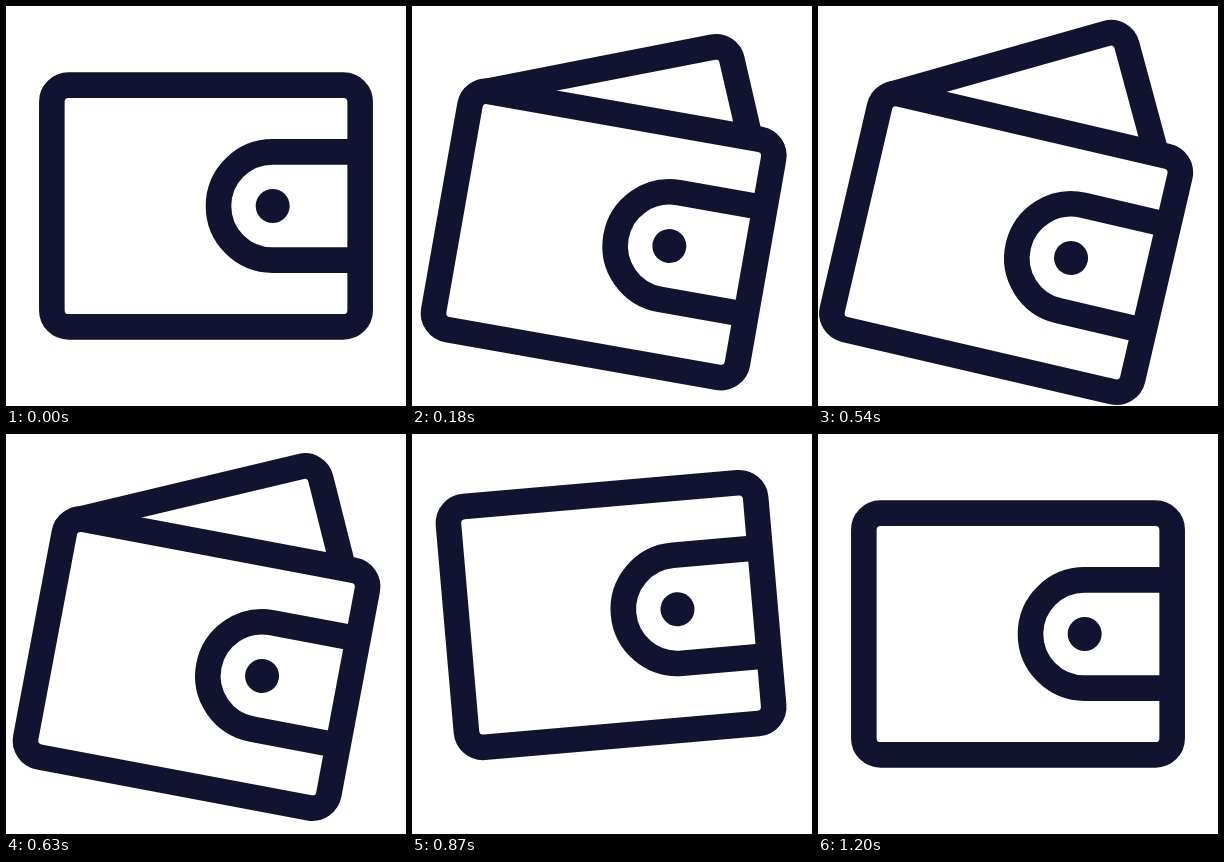
Recreate the animation shown at these times as an HTML page with a canvas. Size 400 px wide and 400 px high, loop 3230 ms.

```html
<!DOCTYPE html>
<html lang="en">
<head>
<meta charset="utf-8">
<title>Wallet</title>
<style>
  html, body { margin: 0; width: 100%; height: 100%; overflow: hidden; background: #fff; }
  canvas { display: block; width: 100vw; height: 100vh; }
</style>
</head>
<body>
<canvas id="stage" width="400" height="400"></canvas>
<script>
const ctx = document.getElementById('stage').getContext('2d');
const INK = '#121331';
const LOOP = 3230, STEP = 30;
const OPEN = 555, RECOIL = 880, REST = 1200;
const PIVOT = [33.3, 166.7];

const lerp = (a, b, k) => a + (b - a) * k;
const mix = (p, q, k) => [lerp(p[0], q[0], k), lerp(p[1], q[1], k)];
const span = (t, from, to) => Math.min(1, Math.max(0, (t - from) / (to - from)));
const smooth = x => x * x * (3 - 2 * x);

// Cubic bezier easing, solved by bisection
function bezier(x1, y1, x2, y2) {
  const at = (a, b, s) => 3 * a * s * (1 - s) ** 2 + 3 * b * s * s * (1 - s) + s ** 3;
  return x => {
    let lo = 0, hi = 1;
    for (let i = 0; i < 30; i++) {
      const mid = (lo + hi) / 2;
      if (at(x1, x2, mid) < x) lo = mid; else hi = mid;
    }
    return x >= 1 ? 1 : at(y1, y2, lo);
  };
}
const swing = bezier(0.167, 0.145, 0, 1);

function pose(t) {
  const up = t <= 0 ? 0 : swing(span(t, 0, OPEN));
  const down = smooth(span(t, OPEN, RECOIL));
  const back = smooth(span(t, RECOIL, REST));
  const recoil = down * (1 - back);
  return {
    angle: 13.1 * up * (1 - down) - 5 * recoil,
    shift: [-3.2 * recoil, -4.5 * recoil],
    card: up * (1 - smooth(span(t, OPEN, 870)))
  };
}

// The card's corner follows the wallet's corner when closed,
// and swings out on a slight arc
function drawCard(k) {
  const bow = 38 * k ** 3 * (1 - k);
  const corner = (from, to) => {
    const [x, y] = mix(from, to, k);
    return [x + bow, y - 0.39 * bow];
  };
  const a = corner([337.5, 79.17], [250.4, -26.9]);
  const tip = corner([354.17, 79.17], [265, -35]);
  const b = corner([354.17, 95.83], [272.7, -20.2]);
  ctx.beginPath();
  ctx.moveTo(...mix([62.5, 79.17], [54.4, 81.2], k));
  ctx.lineTo(...a);
  ctx.bezierCurveTo(...mix(a, tip, 0.552), ...mix(b, tip, 0.552), ...b);
  ctx.lineTo(lerp(331, 327, k), 81);
  ctx.stroke();
}

function drawWallet() {
  ctx.beginPath();
  ctx.roundRect(45.83, 79.17, 308.34, 241.66, 16.67);
  ctx.fillStyle = '#fff';
  ctx.fill();
  ctx.stroke();

  ctx.beginPath();
  ctx.moveTo(350, 145.83);
  ctx.lineTo(266.67, 145.83);
  ctx.arc(266.67, 200, 54.17, -Math.PI / 2, Math.PI / 2, true);
  ctx.lineTo(350, 254.17);
  ctx.stroke();

  ctx.beginPath();
  ctx.arc(266.67, 200, 17, 0, 2 * Math.PI);
  ctx.fillStyle = INK;
  ctx.fill();
}

function draw(t) {
  const { angle, shift, card } = pose(t);
  ctx.setTransform(1, 0, 0, 1, 0, 0);
  ctx.fillStyle = '#fff';
  ctx.fillRect(0, 0, 400, 400);
  ctx.translate(PIVOT[0] + shift[0], PIVOT[1] + shift[1]);
  ctx.rotate(angle * Math.PI / 180);
  ctx.translate(-PIVOT[0], -PIVOT[1]);
  ctx.strokeStyle = INK;
  ctx.lineWidth = 25.6;
  ctx.lineCap = 'round';
  ctx.lineJoin = 'round';
  if (card > 0) drawCard(card);
  drawWallet();
}

const start = performance.now();
function tick() {
  const t = (performance.now() - start) % LOOP;
  draw(Math.min(REST, Math.floor(t / STEP) * STEP));
  requestAnimationFrame(tick);
}
tick();
</script>
</body>
</html>
```
